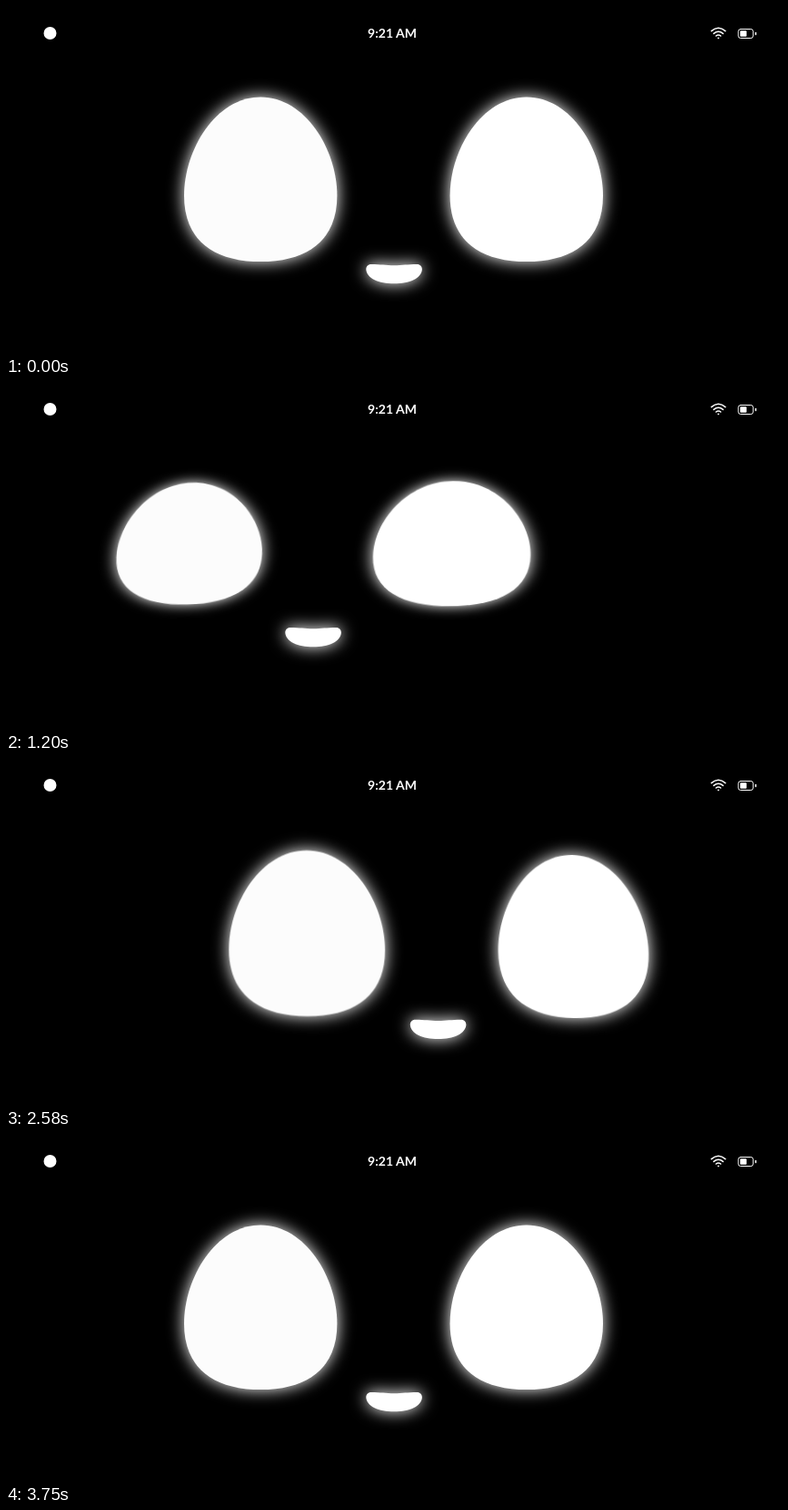
Animation of 854 by 384 pixels, one loop 3.9 s. Source, as an HTML page:

```html
<!DOCTYPE html>
<html lang="en">
<head>
<meta charset="utf-8">
<title>Blinking face</title>
<style>
  html, body { margin: 0; width: 100%; height: 100%; overflow: hidden; background: #000; }
  svg { display: block; width: 854px; height: 384px; }
  text { font: 700 14px Lato, Carlito, sans-serif; }
</style>
</head>
<body>
<svg viewBox="0 0 854 384" fill="#fff">
  <defs>
    <filter id="glow" filterUnits="userSpaceOnUse" x="-140" y="-140" width="280" height="280" color-interpolation-filters="sRGB">
      <feGaussianBlur stdDeviation="9" result="halo"/>
      <feMerge><feMergeNode in="halo"/><feMergeNode in="SourceGraphic"/></feMerge>
    </filter>
    <path id="egg" d="M0-90.8C49-90.8 84.2-33 84.2 18C84.2 66 53 90.8 0 90.8S-84.2 66-84.2 18C-84.2-33-49-90.8 0-90.8Z"/>
  </defs>

  <circle cx="48.5" cy="30" r="7"/>
  <text x="425" y="34.5" text-anchor="middle">9:21 AM</text>

  <g fill="none" stroke="#fff" stroke-width="1.5" stroke-linecap="round">
    <path d="M776.3 27.6Q784 20.8 791.7 27.6M778.9 30.4Q784 26.2 789.1 30.4M781.4 33Q784 31 786.6 33"/>
    <rect x="806" y="25.5" width="16.2" height="10" rx="2.4" stroke-width="1"/>
  </g>
  <circle cx="784" cy="35.4" r="0.9"/>
  <rect x="808" y="27.3" width="7" height="6.4" rx="0.8"/>
  <rect x="824.3" y="28.8" width="1.5" height="3.4" rx="0.7"/>

  <g id="left"><use href="#egg" fill="#fcfcfc" filter="url(#glow)"/></g>
  <g id="right"><use href="#egg" filter="url(#glow)"/></g>
  <g id="mouth">
    <path filter="url(#glow)" d="M-25-10.5C-15-10.5-9-9.3 0-9.3S15-10.5 25-10.5C29-10.5 30.8-8 30.8-4.8C30 5 17 10.8 0 10.8S-30 5-30.8-4.8C-30.8-8-29-10.5-25-10.5Z"/>
  </g>
</svg>
<script>
const LOOP = 3900, TICK = 30;
const [left, right, mouth] = ['left', 'right', 'mouth'].map(id => document.getElementById(id));

// Each pose: left eye dx, dy, width, height, skew; the same for the right eye; mouth dx, dy.
const CENTER   = [0, 0, 1, 1, 0,  0, 0, 1, 1, 0,  0, 0];
const LEFT_DIP = [-60, 3.4, .974, .99, -.008,  -62.3, 4, 1.015, 1.01, 0,  -64.5, 3.3];
const LEFT     = [-78, -13, .952, .965, -.03,  -82, -13, 1.03, .99, -.012,  -89, -14];
const RIGHT_DIP = [51, 2.2, 1.02, 1.008, .003,  51.4, 5.7, .983, .992, .015,  48.5, 3.7];
const RIGHT    = [119, -10.3, 1.02, .986, .014,  114, -4.8, .95, .953, .035,  116, -8];

const progress = (t, from, to) => Math.min(1, Math.max(0, (t - from) / (to - from)));
const inOut = p => p < .5 ? 2 * p * p : 1 - 2 * (1 - p) ** 2;
const sine = p => (1 - Math.cos(Math.PI * p)) / 2;
const mix = (a, b, p) => a.map((v, i) => v + (b[i] - v) * p);

// Quadratic curve from a to b that passes through mid at p = m.
const arc = (a, mid, b, m, p) => a.map((v, i) =>
  v * (p - m) * (p - 1) / m +
  mid[i] * p * (p - 1) / (m * (m - 1)) +
  b[i] * p * (p - m) / (1 - m));

function poseAt(t) {
  if (t < 47) {
    const path = t => sine(progress(t, 17, 34));
    return arc(CENTER, LEFT_DIP, LEFT, path(24), path(t));
  }
  if (t < 73) return mix(LEFT, CENTER, inOut(progress(t, 47, 67)));
  if (t < 104) return arc(CENTER, RIGHT_DIP, RIGHT, .4225, progress(t, 73, 93) ** 2);
  return mix(RIGHT, CENTER, inOut(progress(t, 104, 125)));
}

const easeOut = p => 1 - (1 - p) ** 3;

// Start, closed, open again, opening curve.
const BLINKS = [
  [0, 5, 16, easeOut],
  [26, 31, 45, inOut],
  [47, 56, 67, inOut],
  [104, 113.5, 125, inOut]
];

function opennessAt(t) {
  const blink = BLINKS.find(([start, , end]) => t >= start && t < end);
  if (!blink) return 1;
  const [start, shut, end, opening] = blink;
  const closed = t < shut ? inOut(progress(t, start, shut)) : 1 - opening(progress(t, shut, end));
  return 1 - .91 * closed;
}

function placeEye(eye, x, [dx, dy, w, h, skew], open) {
  eye.setAttribute('transform', `matrix(${w} ${skew * open} ${skew} ${h * open} ${x + dx} ${191.3 + dy})`);
}

function render(ms) {
  const t = Math.floor(ms % LOOP / TICK);
  const pose = poseAt(t), open = opennessAt(t);
  placeEye(left, 280.2, pose.slice(0, 5), open);
  placeEye(right, 572.8, pose.slice(5, 10), open);
  mouth.setAttribute('transform', `translate(${427.1 + pose[10]} ${295.5 + pose[11]})`);
}

const begin = performance.now();
function loop() {
  render(performance.now() - begin);
  requestAnimationFrame(loop);
}
render(0);
requestAnimationFrame(loop);
</script>
</body>
</html>
```
